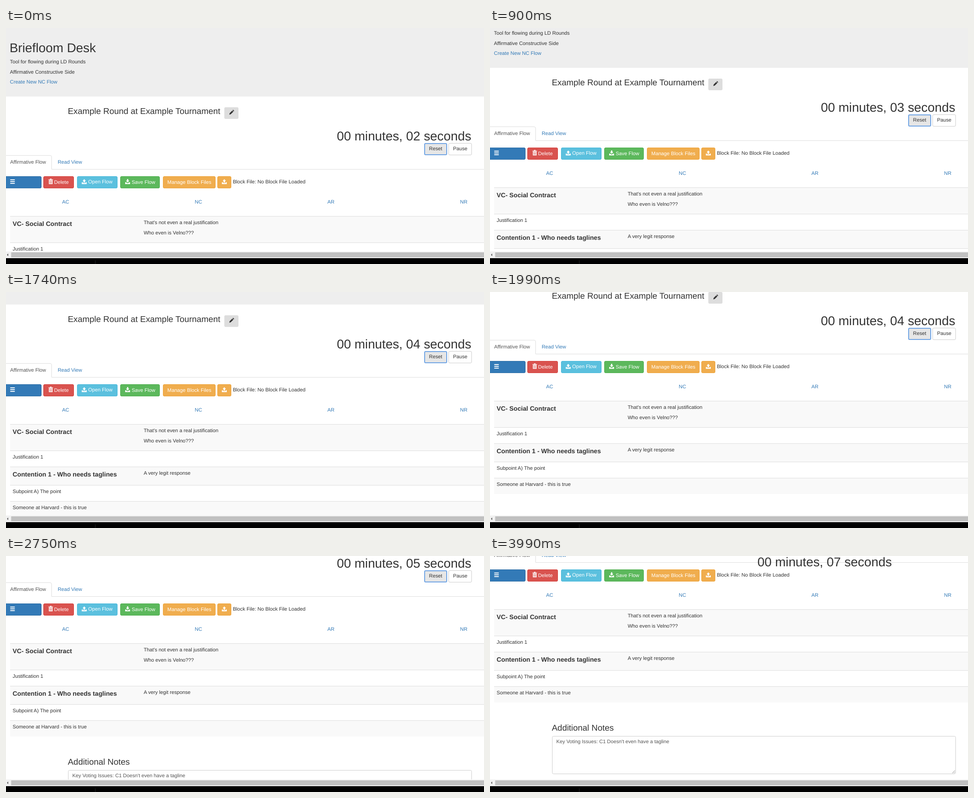
An HTML page that plays this animation: 1063 px wide and 527 px high, repeating every 4.6 s.

```html
<!DOCTYPE html>
<html lang="en">
<head>
<meta charset="utf-8">
<title>Round notes</title>
<style>
html, body { margin: 0; width: 100%; height: 100%; overflow: hidden; background: #fff; }
svg { display: block; }
text { font: 11.23px "Liberation Sans", Arial, sans-serif; fill: #333; text-rendering: geometricPrecision; white-space: pre; }
.link { fill: #337ab7; }
.white { fill: #fff; }
.soft { fill: #555; }
.h1 { font-size: 28.3px; }
.h3 { font-size: 18.92px; }
.h4 { font-size: 14.15px; font-weight: bold; }
</style>
</head>
<body>
<svg id="stage" width="1063" height="527" viewBox="0 0 1063 527">
  <defs>
    <clipPath id="view"><rect width="1063" height="499"/></clipPath>
    <path id="up" d="M5.5 0L9.3 4.2H7V7.4H4V4.2H1.7ZM0 7H2.6V8.6H8.4V7H11V11H0Z"/>
    <path id="down" d="M4 0H7V3.2H9.3L5.5 7.4L1.7 3.2H4ZM0 7H2.4L4 8.8H7L8.6 7H11V11H0Z"/>
    <path id="bars" d="M0 0H10V2H0ZM0 4H10V6H0ZM0 8H10V10H0Z"/>
    <path id="bin" fill-rule="evenodd" d="M3.2 0H6.8V1.4H10V3H0V1.4H3.2ZM.8 3.8H9.2V12H.8ZM2.3 5V10.6H3.2V5ZM4.5 5V10.6H5.4V5ZM6.8 5V10.6H7.7V5Z"/>
    <path id="pencil" d="M0 11L1 7.6L6.6 2L9 4.4L3.4 10ZM7.3 1.3L8.6 0L11 2.4L9.7 3.7Z"/>
  </defs>
  <g clip-path="url(#view)">
    <g id="page"></g>
    <text id="clock" class="h1"></text>
  </g>
  <rect y="499" width="1063" height="15" fill="#f1f1f1"/>
  <rect x="11.5" y="501" width="1052" height="11" fill="#c0c0c0"/>
  <path d="M2 506.5L5 503.5V509.5Z" fill="#606060"/>
  <rect y="514" width="1063" height="13"/>
  <rect x="198" y="519" width="1" height="8" fill="#222"/>
</svg>
<script>
const LOOP = 4600;
const NS = "http://www.w3.org/2000/svg";
const page = document.getElementById("page");
const clock = document.getElementById("clock");

function add(tag, attrs, content = "") {
  const el = document.createElementNS(NS, tag);
  for (const key in attrs) el.setAttribute(key, attrs[key]);
  el.textContent = content;
  page.append(el);
}
const text = (x, y, str, cls = "") => add("text", { x, y, class: cls }, str);
const box = (x, y, width, height, fill, stroke = "none", rx = 0, weight = 1) =>
  add("rect", { x, y, width, height, fill, stroke, rx, "stroke-width": weight });
const icon = (id, x, y, fill = "#fff") => add("use", { href: "#" + id, x, y, fill });
const line = (d, stroke = "#ddd", fill = "none") => add("path", { d, stroke, fill });
const button = (x1, x2, fill, stroke) => box(x1 + .5, 331.5, x2 - x1 - 1, 26, fill, stroke, 2.5);

// header
box(0, 0, 1063, 153, "#eee");
text(8, 54, "Briefloom Desk", "h1");
text(8.8, 79, "Tool for flowing during LD Rounds");
text(8.8, 102, "Affirmative Constructive Side");
text(8.8, 124, "Create New NC Flow", "link");

text(137.5, 192, "Example Round at Example Tournament", "h3");
box(485.5, 177, 31.5, 26, "#ddd", "none", 3);
icon("pencil", 496.5, 182.5, "#333");

// clock buttons
box(931, 258, 49, 25, "#e6e6e6", "#6ea3e4", 2, 2);
text(940.8, 273, "Reset");
box(984.5, 257.5, 51, 26, "#fff", "#ccc", 2.5);
text(994.3, 273, "Pause");

// tabs
line("M-1 284.5H98Q101.5 284.5 101.5 288V315.5H1064");
text(9.3, 303, "Affirmative Flow", "soft");
text(115, 303, "Read View", "link");

// toolbar
button(-5, 79, "#337ab7", "#2e6da4");
icon("bars", 9.5, 338);
button(83, 151, "#d9534f", "#d43f3a");
icon("bin", 94.5, 336.5);
text(107, 348, "Delete", "white");
button(158, 248, "#5bc0de", "#46b8da");
icon("up", 168.5, 337.5);
text(182.7, 347, "Open Flow", "white");
button(254, 342, "#5cb85c", "#4cae4c");
icon("down", 265, 337.5);
text(279.4, 348, "Save Flow", "white");
button(349, 466, "#f0ad4e", "#eea236");
text(358.8, 348, "Manage Block Files", "white");
button(470, 501, "#f0ad4e", "#eea236");
icon("up", 480, 337.5);
text(504.4, 347, "Block File: No Block File Loaded");

// table
["AC", "NC", "AR", "NR"].forEach((name, i) => text(124.8 + 295 * i, 392, name, "link"));
const edges = [420, 479, 515, 556, 592, 628];
for (let i = 0; i < 5; i++) {
  if (i % 2 === 0) box(9, edges[i], 1054, edges[i + 1] - edges[i], "#f9f9f9");
  line(`M9 ${edges[i] + .5}H1063`);
}
text(14.8, 442, "VC- Social Contract", "h4");
text(306.2, 438, "That's not even a real justification");
text(306.2, 461, "Who even is Velno???");
text(14.8, 497, "Justification 1");
text(14.8, 537, "Contention 1 - Who needs taglines", "h4");
text(306.2, 533, "A very legit response");
text(14.8, 574, "Subpoint A) The point");
text(14.8, 610, "Someone at Harvard - this is true");

// notes
text(137.5, 691, "Additional Notes", "h3");
box(138.5, 703.5, 897, 84, "#fff", "#ccc", 3);
text(147.5, 719, "Key Voting Issues: C1 Doesn't even have a tagline", "soft");
line("M1028 786L1034 780M1031.5 786L1034 783.5", "#888");

// [time, value] steps
const scrolls = [
  [0, 0], [590, 3], [670, 16], [750, 32], [830, 48], [900, 64], [980, 80], [1060, 96], [1130, 111], [1210, 122],
  [1740, 125], [1820, 142], [1900, 160], [1990, 177], [2060, 190], [2140, 200], [2220, 210], [2300, 217], [2370, 221],
  [2750, 225], [2830, 288], [2910, 301]
];
const ticks = [[0, 2], [220, 3], [1210, 4], [2140, 5], [3060, 6], [3990, 7]];
const PIN_AT = 230;

const valueAt = (steps, t) => steps.filter(step => step[0] <= t).pop()[1];

function draw(t) {
  const top = valueAt(scrolls, t);
  const pinned = top > PIN_AT;
  page.setAttribute("transform", `translate(0 ${-top})`);
  clock.textContent = `00 minutes, 0${valueAt(ticks, t)} seconds`;
  clock.setAttribute("x", pinned ? 594.7 : 735.7);
  clock.setAttribute("y", pinned ? 23 : 251 - top);
}

const start = performance.now();
function frame() {
  draw((performance.now() - start) % LOOP);
  requestAnimationFrame(frame);
}
frame();
</script>
</body>
</html>
```
